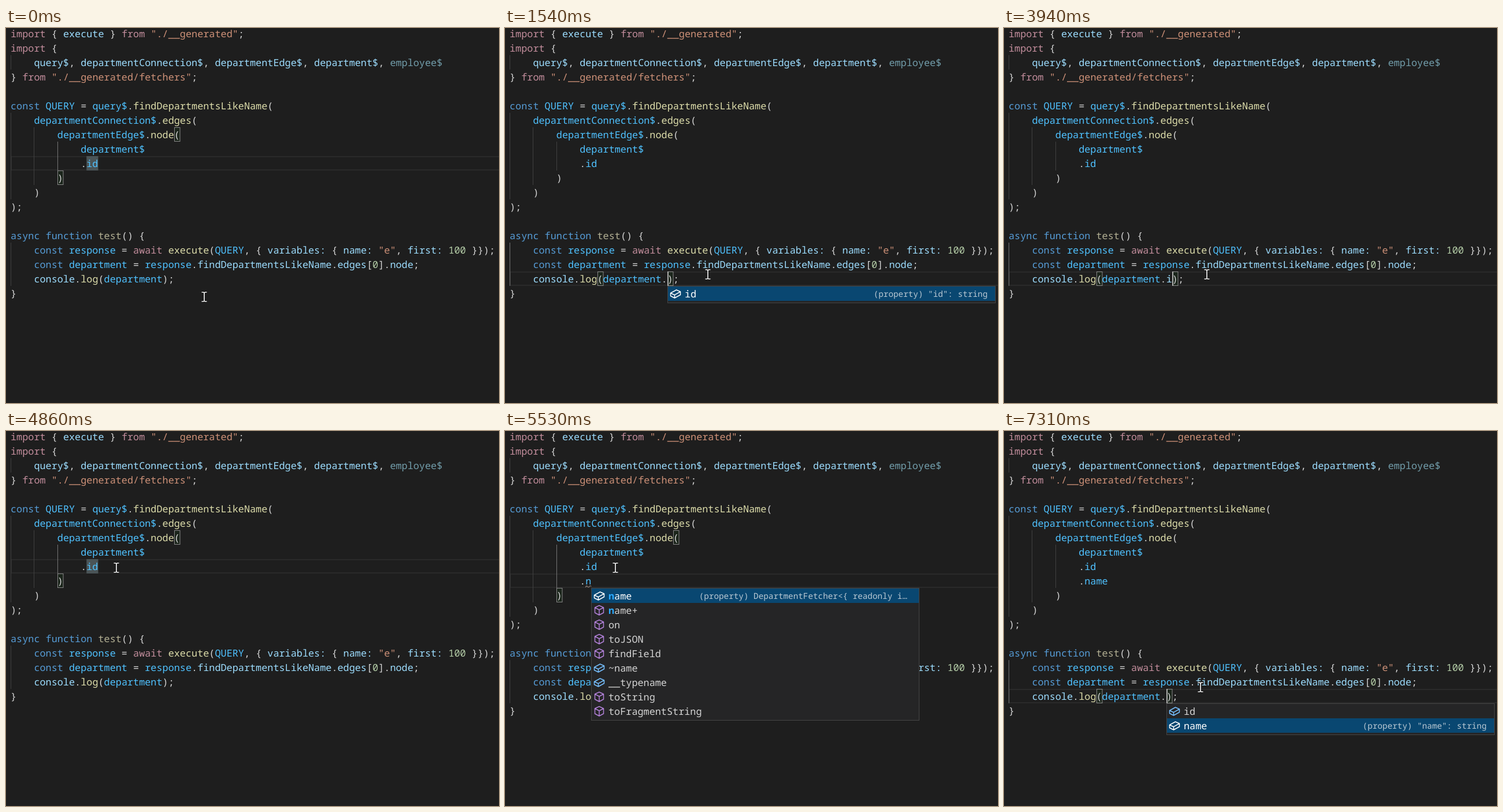
An HTML page that plays this animation: 853 px wide and 650 px high, repeating every 8000 ms.

```html
<!DOCTYPE html>
<html lang="en">
<head>
<meta charset="utf-8">
<title>Typed query editing</title>
<style>
html, body { margin: 0; width: 100%; height: 100%; overflow: hidden; background: #1e1e1e; }
svg { display: block; width: 853px; height: 650px; }
text {
  font: 16.83px "Noto Sans Mono", "DejaVu Sans Mono", monospace;
  white-space: pre;
  text-rendering: geometricPrecision;
}
text.detail { font-size: 14.3px; }
</style>
</head>
<body>
<svg id="stage" viewBox="0 0 853 650"></svg>
<script>
const LOOP = 8000, CHAR = 10.1, ROW = 25;
const stage = document.getElementById('stage');

const COLORS = {
  p: '#c28d9c', d: '#d4d4d4', v: '#9cdcfe', c: '#4fc1ff', k: '#569cd6',
  f: '#dcdcaa', s: '#ce9178', n: '#b5cea8', u: '#729daa', t: '#b3b094',
  w: '#ffffff', h: '#2aaaff'
};

// Tokens are separated by "|"; the first letter of each picks its colour.
const HEAD = [
  'pimport|d { |vexecute|d } |pfrom|d |s"./__generated"|d;',
  'pimport|d {',
  'd    |vquery$|d, |vdepartmentConnection$|d, |vdepartmentEdge$|d, |vdepartment$|d, |uemployee$',
  'd} |pfrom|d |s"./__generated/fetchers"|d;',
  '',
  'kconst|d |cQUERY|d = |cquery$|d.|ffindDepartmentsLikeName|d(',
  'd    |cdepartmentConnection$|d.|fedges|d(',
  'd        |cdepartmentEdge$|d.|fnode|d(',
  'd            |cdepartment$',
  'd            .|cid'
];
const TAIL = [
  'd        )',
  'd    )',
  'd);',
  ''
];
const BODY = [
  'd    |kconst|d |cresponse|d = |pawait|d |fexecute|d(|cQUERY|d, { |vvariables:|d { |vname:|d |s"e"|d, |vfirst:|d |n100|d }});',
  'd    |kconst|d |cdepartment|d = |cresponse|d.|vfindDepartmentsLikeName|d.|vedges|d[|n0|d].|vnode|d;'
];

// Menu items: "#" marks a method, the others are properties.
const ALL = ['__typename', 'employees', '#findField', 'id', 'name', '#name+', '#on',
  '#toFragmentString', '#toJSON', '#toString', '~id', '~name'];
const MATCHED = ['name', '#name+', '#on', '#toJSON', '#findField', '~name',
  '__typename', '#toString', '#toFragmentString'];
const FETCHER = '(property) DepartmentFetcher<{ readonly i…';

const POINTER = [
  [0, 343, 466], [1000, 336, 465], [1070, 318, 461], [1140, 298, 457], [1220, 268, 434],
  [1400, 308, 431], [1470, 351, 427],
  [4220, 330, 390], [4290, 282, 322], [4360, 230, 265], [4430, 191, 237],
  [6290, 197, 250], [6350, 216, 288], [6420, 244, 340], [6500, 275, 388],
  [6590, 295, 419], [6710, 284, 446], [6780, 274, 460],
  [7110, 304, 454], [7180, 340, 444]
];
const CALL_TEXT = [[0, ''], [1470, '.'], [2740, '.i'], [2810, '.id'],
  [3940, '.i'], [4010, '.'], [4080, ''], [7110, '.']];
const NEW_TEXT = [[0, ''], [5000, '.'], [5320, '.n'], [6030, '.name']];

const at = (keys, t) => keys.findLast(k => k[0] <= t);
const within = (t, a, b) => t >= a && t < b;
const colX = c => 8 + c * CHAR;
const rowY = r => r * ROW - 3;
const esc = s => s.replace(/&/g, '&amp;').replace(/</g, '&lt;');
const span = (color, s) => `<tspan fill="${color}">${esc(s)}</tspan>`;
const rect = (x, y, w, h, attrs) => `<rect x="${x}" y="${y}" width="${w}" height="${h}" ${attrs}/>`;

function code(line, row) {
  const spans = line.split('|').map(s => span(COLORS[s[0]], s.slice(1))).join('');
  return `<text x="8" y="${rowY(row) + 19}">${spans}</text>`;
}

function guide(col, from, to, active) {
  return rect(Math.round(colX(col)), rowY(from), 1, (to - from + 1) * ROW,
    `fill="${active ? '#767676' : '#404040'}"`);
}

const wordMark = (col, row, n) =>
  rect(colX(col), rowY(row), n * CHAR, ROW, 'fill="#4a5457"');

const bracket = (col, row) =>
  rect(Math.round(colX(col)) + .5, rowY(row) + .5, 9.5, 24, 'fill="#006400" fill-opacity=".1" stroke="#888"');

const lineMark = row =>
  rect(9, rowY(row) + 1, 860, 23, 'fill="none" stroke="#2a2a2a" stroke-width="2"');

const squiggle = (col, row) =>
  `<path d="M${colX(col)} ${rowY(row) + 24}q1.7 -4 3.4 -1.5t3.3 0t3.3 0" fill="none" stroke="#98877f" stroke-width="1.2"/>`;

function icon(x, y, method, selected) {
  const d = method
    ? 'M0 -8L7.5 -4.5V4.5L0 8.5L-7.5 4.5V-4.5ZM-7.5 -4.5L0 -.5L7.5 -4.5M0 -.5V8.5'
    : 'M-8.5 -1L1.5 -6.5L8.5 -3.5V2L-1.5 7.5L-8.5 4ZM-8.5 -1L-1.5 2.2L8.5 -3.5M-1.5 2.2V7.5';
  const color = selected ? '#fff' : method ? '#b180d7' : '#75beff';
  return `<path transform="translate(${x} ${y})" d="${d}" fill="none" stroke="${color}" stroke-width="1.5" stroke-linejoin="round"/>`;
}

function menu(col, row, items, selected, detail, typed = '') {
  const x = Math.round(colX(col)), y = rowY(row), w = 567;
  let out = rect(x + .5, y + .5, w, items.length * ROW + 4, 'fill="#252526" stroke="#454545"');
  items.forEach((item, i) => {
    const top = y + 1 + i * ROW, on = i === selected;
    const label = item.replace('#', '');
    const n = label.startsWith(typed) ? typed.length : 0;
    if (on) out += rect(x + 1, top, w - 1, ROW, 'fill="#094771"');
    out += icon(x + 14, top + 12.5, item[0] === '#', on);
    out += `<text x="${x + 30}" y="${top + 18.5}"><tspan font-weight="700">${span(COLORS.h, label.slice(0, n))}</tspan>` +
      span(on ? COLORS.w : COLORS.d, label.slice(n)) + '</text>';
    if (on) {
      const right = x + w - (detail.endsWith('…') ? 20 : 13);
      out += `<text class="detail" x="${right}" y="${top + 17.5}" text-anchor="end" fill="#b9c8d3">${esc(detail)}</text>`;
    }
  });
  return out;
}

function pointer(t) {
  const [, x, y] = at(POINTER, t);
  const beam = 'M-4.5 -8H-1.5L0 -7L1.5 -8H4.5M0 -7V7M-4.5 8H-1.5L0 7L1.5 8H4.5';
  const stroke = (color, w) => `<path d="${beam}" fill="none" stroke="${color}" stroke-width="${w}"/>`;
  const click = within(t, 1220, 1330) || within(t, 4500, 4640) || within(t, 6830, 6970);
  return `<g transform="translate(${x} ${y})">` +
    (click ? '<circle r="11" fill="#f4ee00" fill-opacity=".6"/>' : '') +
    stroke('#111', 3.4) + stroke('#f4f4f4', 1.7) + '</g>';
}

function draw(t) {
  const added = t >= 4930 ? 1 : 0;
  const call = at(CALL_TEXT, t)[1], fresh = at(NEW_TEXT, t)[1];
  const low = within(t, 1220, 4570) || t >= 6830;
  const callRow = 17 + added, caretCol = 26 + call.length;

  const lines = [
    ...HEAD,
    ...(added ? [`d            ${fresh.slice(0, 1)}|c${fresh.slice(1)}`] : []),
    ...TAIL,
    `kasync|d |kfunction|d |${within(t, 2740, 2880) ? 'f' : 't'}test|d() {`,
    ...BODY,
    `d    |vconsole|d.|flog|d(|cdepartment|d${call.slice(0, 1)}|v${call.slice(1)}|d);`,
    'd}'
  ];

  let out = rect(0, 0, 853, 650, 'fill="#1e1e1e"');
  out += lineMark(low ? callRow : 9 + added);
  if (t < 1140 || within(t, 4780, 4930)) out += wordMark(13, 9, 2);
  if (within(t, 1330, 1470) || within(t, 6970, 7110))
    out += wordMark(10, callRow - 1, 10) + wordMark(16, callRow, 10);

  out += guide(0, 2, 2) + guide(0, 6, 11 + added) + guide(4, 7, 10 + added) +
    guide(8, 8, 9 + added, !low) + guide(0, 15 + added, callRow, low);
  out += low
    ? bracket(15, callRow) + bracket(caretCol, callRow)
    : bracket(28, 7) + bracket(8, 10 + added);
  out += lines.map(code).join('');

  if (call === '.i' && t < 2810) out += squiggle(27, 17);
  if (fresh === '.n') out += squiggle(13, 10);
  if (low) out += rect(Math.round(colX(caretCol)), rowY(callRow), 2, ROW, 'fill="#aeafad"');

  if (within(t, 1540, 2740)) out += menu(27, 18, ['id'], 0, '(property) "id": string');
  if (within(t, 2740, 2810)) out += menu(28, 18, ['id'], 0, '(property) "id": string', 'i');
  if (within(t, 5070, 5390)) out += menu(13, 11, ALL, 0, FETCHER);
  if (within(t, 5390, 6030)) out += menu(14, 11, MATCHED, 0, FETCHER, 'n');
  if (t >= 7250) out += menu(27, 19, ['id', 'name'], 1, '(property) "name": string');

  return out + pointer(t);
}

let shown = '';
function tick(now) {
  const next = draw(now % LOOP);
  if (next !== shown) stage.innerHTML = shown = next;
  requestAnimationFrame(tick);
}
tick(performance.now());
</script>
</body>
</html>
```
